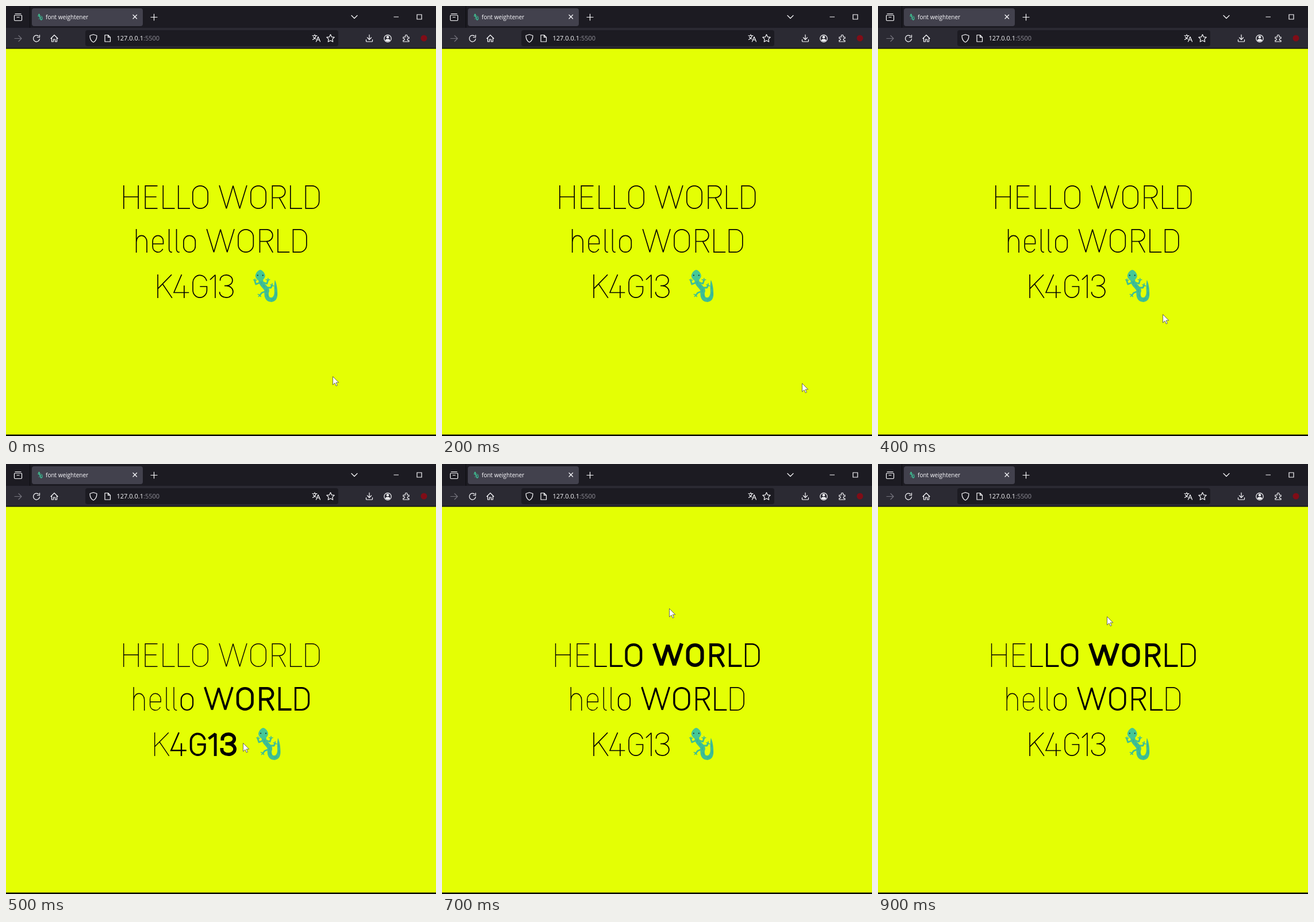
Write an HTML page that moves like this. It is 748 px wide and 748 px high and loops after 1 s.

```html
<!DOCTYPE html>
<html lang="en">
<head>
<meta charset="utf-8">
<title>font weightener</title>
<style>
html, body { margin: 0; width: 100%; height: 100%; overflow: hidden; background: #e4ff04; }
svg { display: block; }
text { font-family: "Open Sans", "Noto Sans", sans-serif; }
.icons { fill: none; stroke: #fbfbfe; stroke-width: 1.2; stroke-linecap: round; stroke-linejoin: round; }
.type { fill: none; stroke: #000; stroke-linecap: square; stroke-miterlimit: 2; }
.type path { vector-effect: non-scaling-stroke; }
</style>
</head>
<body>
<svg width="748" height="748" viewBox="0 0 748 748">
  <defs>
    <g id="lizard" stroke-linecap="round" stroke-linejoin="round">
      <g fill="none" stroke="#3fbf93">
        <path stroke-width="2.800" d="M12 22L5 25L3 19M18 22L24 24L26 18M20 38L15 40L12 44M25 31L31 31L33 27"/>
        <path stroke-width="1.600" d="M3 19L.9 17M3 19L3.4 15.8M3 19L6 17.8M26 18L22.6 17M26 18L26 14.8M26 18L29 17M12 44L8.6 42.6M12 44L9.5 46.5M12 44L13.5 46.5M33 27L30.3 25.6M33 27L33.3 23.8M33 27L36 28"/>
        <path stroke-width="8" d="M13.500 18C14 28 23.500 29 24 37"/>
        <path stroke-width="7.500" d="M24 35C22 46 25 52 31 52"/>
      </g>
      <path fill="#3fbf93" d="M29 48.300C35 49.500 37.500 44 37 36C36.600 29 37 23 38 17.500C41 23 42.500 33 42.500 42C42.500 51 38 56 31 55.800z"/>
      <path fill="#45c796" d="M12.500 0C16 0 21 6 21 10.500C21 14 17 19 12.500 19C8 19 4 14 4 10.500C4 6 9 0 12.500 0z"/>
      <path fill="none" stroke="#35b09b" stroke-width="1.700" d="M14 21L15 24M18 27L20 30M23 34V38M24 43L26 47M32 52L36 50M40 44V39M39.500 33V29"/>
      <path fill="none" stroke="#222b2b" stroke-width="2.200" d="M8 9.500h.1M17 9.500h.1"/>
    </g>
  </defs>

  <rect width="748" height="748" fill="#e4ff04"/>
  <rect y="745.500" width="748" height="2.500" fill="#050505"/>
  <rect width="748" height="38" fill="#1c1b22"/>
  <rect y="38" width="748" height="35" fill="#2b2a33"/>
  <rect y="73" width="748" height="1.500" fill="#0c0c10"/>
  <path d="M41.500 0V38" stroke="#0c0c10"/>
  <rect x="45" y="4" width="193" height="31" rx="4" fill="#42414d"/>
  <rect x="138" y="42" width="440" height="28" rx="4" fill="#1c1b22"/>
  <use href="#lizard" transform="translate(55 13.500) scale(.2)"/>
  <text x="69" y="23" font-size="10" fill="#fbfbfe">font weightener</text>
  <text x="192.500" y="60" font-size="11" fill="#fbfbfe">127.0.0.1<tspan fill="#92919a">:5500</tspan></text>

  <g class="icons">
    <path d="M16 13.500H26M15.500 16H26.500Q27.500 16 27.500 17V24Q27.500 25.500 26 25.500H16Q14.500 25.500 14.500 24V17Q14.500 16 15.500 16zM19 19.500H23"/>
    <path d="M221 15.500L227.500 22M227.500 15.500L221 22M252 19.500H263M257.500 14V25M601 16.500L606 21.500L611 16.500"/>
    <path d="M674.500 19H683M715 15H723V23H715z" stroke-linecap="butt" stroke-linejoin="miter"/>
    <path stroke="#74737c" d="M15 56.500H27M22 51.500L27 56.500L22 61.500"/>
    <path d="M58.500 57A5.500 5.500 0 1 1 56.500 52.300M58.500 50.500V54.500H54.500"/>
    <path d="M78 56.500L84 50.500L90 56.500M79.500 55.500V62H82.500V58H85.500V62H88.500V55.500"/>
    <path d="M152 49.500L158 51.500C158 57 156.500 61 152 63C147.500 61 146 57 146 51.500z"/>
    <path d="M172 50.500H177.500L181.500 54.500V62H172zM177.500 50.500V54.500H181.500"/>
    <path d="M533 51.500H541M537 49.500V51.500M539.500 51.500Q538 56.500 533.500 58.500M534.500 53.500Q536.500 57 539 57.500M539.500 62L543 53.500L546.500 62M540.800 59H545.200"/>
    <path d="M564.500 49.500L566.500 53.800L571.200 54.400L567.800 57.600L568.700 62.200L564.500 60L560.300 62.200L561.200 57.600L557.800 54.400L562.500 53.800z"/>
    <path d="M632 50V58.500M628.500 55L632 58.500L635.500 55M626.500 58.500V61Q626.500 62 627.500 62H636.500Q637.500 62 637.500 61V58.500"/>
    <circle cx="664" cy="56.500" r="6.200"/>
    <path fill="#fbfbfe" d="M664 52.500a1.700 1.700 0 1 1-.1 0zM660.500 60Q661 58 662.500 58H665.500Q667 58 667.500 60Q664 62 660.500 60z"/>
    <path d="M691 54H694.500V52A1.700 1.700 0 0 1 698 52V54H701V56.500H700A1.700 1.700 0 0 0 700 60H701V62H691V59.500H692A1.500 1.500 0 0 0 692 56.500H691z"/>
  </g>
  <circle cx="727" cy="56" r="5.500" fill="#800d17"/>

  <g id="type" class="type"></g>
  <path id="pointer" d="M.5 .5V15L4 11.800L6.300 17L8.400 16L6.200 11H10.800z" fill="#fff" stroke="#444" stroke-width=".8"/>
</svg>

<script>
const CAP = 41, MID = 374, SPACE = 13;

// character: [left bearing, width, advance, centre line, extra advance when bold]
const GLYPHS = {
  H: [5.5, 27, 37.5, "M0 0V41M27 0V41M0 20H27"],
  E: [5.5, 22, 31, "M22 0H0V41H22M0 20H20"],
  L: [5.5, 21, 26.5, "M0 0V41H21"],
  O: [4, 28, 36, "M0 13.5a14 13.5 0 0 1 28 0v14a14 13.5 0 0 1-28 0z"],
  W: [1.5, 49, 52, "M0 0L12.5 41L24.5 0L36.5 41L49 0"],
  R: [5.5, 24, 31.5, "M0 41V0H13a11 10.75 0 0 1 0 21.5H0M13 21.5L24 41"],
  D: [5.5, 25, 34.5, "M0 0H12a13 13 0 0 1 13 13v15a13 13 0 0 1-13 13H0z"],
  h: [5.5, 20, 30, "M0 0V41M0 22a10 11 0 0 1 20 0V41"],
  e: [4, 20, 28, "M0 26H20V21a10 10 0 0 0-20 0v10a10 10 0 0 0 18.66 5"],
  l: [4.5, 6, 12.9, "M0 0V35a5.5 6 0 0 0 6 6"],
  o: [4, 22, 30, "M0 21.5a11 10.5 0 0 1 22 0v9a11 10.5 0 0 1-22 0z"],
  K: [5.5, 26, 32, "M0 0V41M25 0L0 25M9 16.5L26 41"],
  4: [1.5, 27, 30.5, "M14 0L0 32H27M19 20V41", 5],
  G: [4, 26, 34, "M25.4 10A13 13.5 0 0 0 0 13.5v14a13 13.5 0 0 0 26 0V21H14", 5],
  1: [0.5, 10, 15, "M0 8L10 0V41", 8],
  3: [1.5, 25, 30.5, "M1 9.5A11.5 9.5 0 0 1 12.5 0a11.5 9.8 0 0 1 0 19.6H10M12.5 19.6a12.5 10.7 0 0 1 0 21.4A12.5 9.5 0 0 1 0 31.5", 5],
};

const POINTER = [[568, 644], [598, 651], [626, 656], [582, 616], [495, 536],
                 [412, 485], [386, 422], [395, 251], [396, 257], [398, 265]];
// the lettering trails the pointer
const FOCUS = { 5: [430, 482], 6: [400, 445], 7: [412, 305], 8: [412, 305], 9: [412, 305] };

function add(tag, attrs, parent) {
  const el = document.createElementNS("http://www.w3.org/2000/svg", tag);
  for (const key in attrs) el.setAttribute(key, attrs[key]);
  return parent.appendChild(el);
}

const typeLayer = document.getElementById("type");
const pointer = document.getElementById("pointer");

function makeLine(string, top) {
  const group = add("g", { role: "img", "aria-label": string }, typeLayer);
  const letters = [...string].map(char => {
    if (char === " ") return { adv: SPACE };
    if (char === "🦎") return { adv: 77.5, lizard: add("use", { href: "#lizard", stroke: "none" }, group) };
    const [lsb, width, adv, d, grow = 4.1] = GLYPHS[char];
    return { lsb, width, adv, grow, el: add("path", { d }, group) };
  });
  let x = MID - letters.reduce((sum, l) => sum + l.adv, 0) / 2;
  for (const l of letters) {
    l.mid = x + l.adv / 2;
    x += l.adv;
  }
  return { top, letters };
}

const lines = [
  makeLine("HELLO WORLD", 312),
  makeLine("hello WORLD", 388),
  makeLine("K4G13 🦎", 467),
];

function layout({ top, letters }, focus) {
  const dy = focus ? top + CAP / 2 - focus[1] : Infinity;
  const base = Math.abs(dy) < 170 ? 1.4 : 1.65;
  const bold = l => l.el && focus ? Math.max(0, 1 - Math.hypot(l.mid - focus[0], dy) / 150) : 0;
  const weights = letters.map(bold);
  const extra = i => weights[i] * (letters[i].grow || 0);
  let x = MID - letters.reduce((sum, l, i) => sum + l.adv + extra(i), 0) / 2;

  letters.forEach((l, i) => {
    if (l.lizard) l.lizard.setAttribute("transform", `translate(${x + 17} ${top - 8})`);
    if (l.el) {
      const stroke = base + 6.3 * weights[i];
      const sx = (l.width + extra(i) - stroke) / l.width;
      const sy = (CAP - stroke) / CAP;
      l.el.setAttribute("transform",
        `matrix(${sx} 0 0 ${sy} ${x + l.lsb + stroke / 2} ${top + stroke / 2})`);
      l.el.setAttribute("stroke-width", stroke);
    }
    x += l.adv + extra(i);
  });
}

let shown = -1;
function draw(now) {
  const step = Math.floor(now / 100) % 10;
  if (step !== shown) {
    shown = step;
    pointer.setAttribute("transform", `translate(${POINTER[step]})`);
    lines.forEach(line => layout(line, FOCUS[step]));
  }
}

const start = performance.now();
function tick() {
  draw(performance.now() - start);
  requestAnimationFrame(tick);
}
tick();
</script>
</body>
</html>
```
